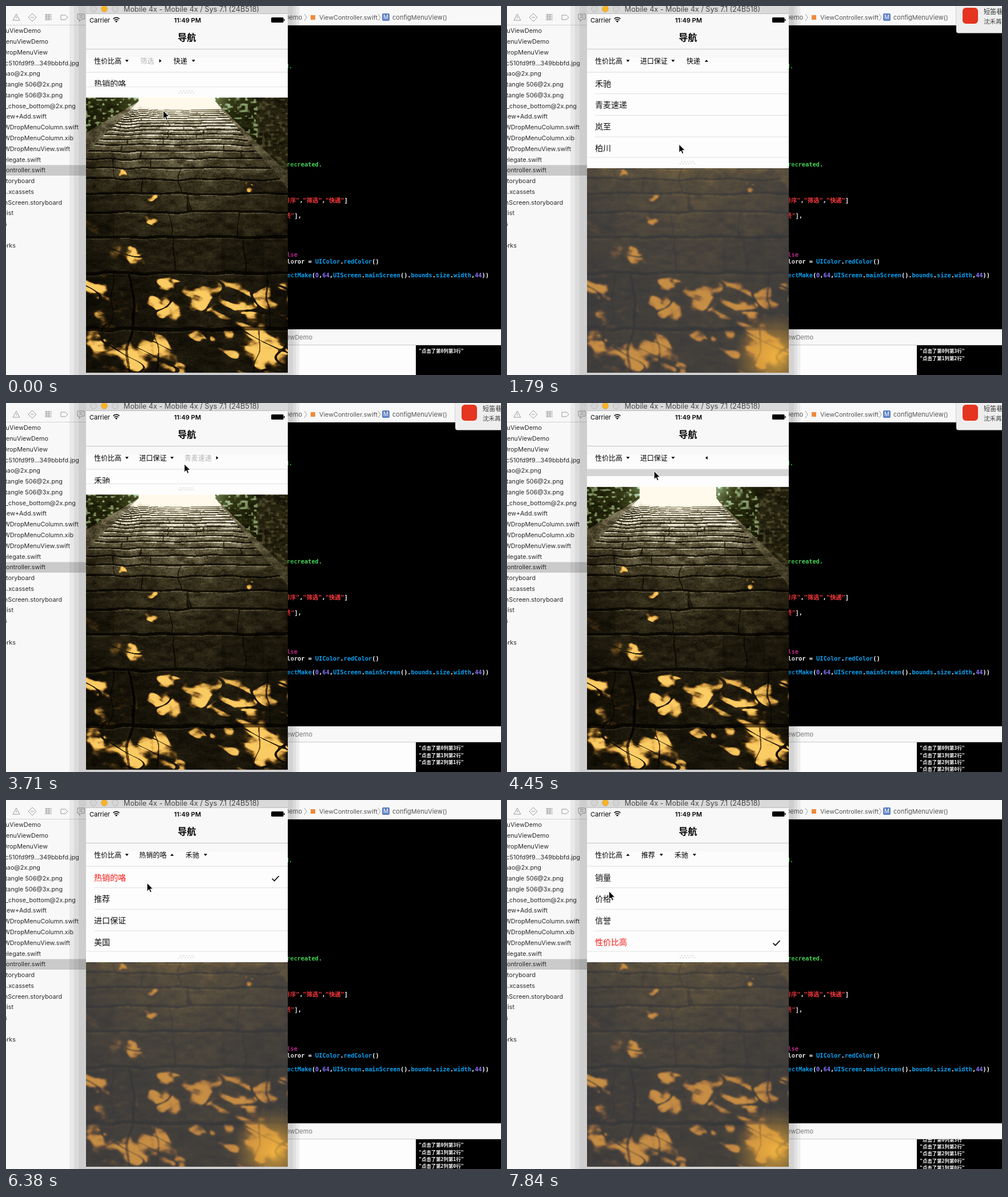
An HTML page with a canvas that plays this animation: 866 by 646 pixels, repeating every 7.99 s.

```html
<!DOCTYPE html>
<html lang="zh">
<head>
<meta charset="utf-8">
<title>Drop menu demo</title>
<style>
html, body { margin: 0; width: 866px; height: 646px; overflow: hidden; background: #f8f8f8; }
svg, canvas { position: absolute; left: 0; top: 0; display: block; }
canvas { left: 140px; top: 114px; }
text { white-space: pre; font-family: Inter, "Noto Sans CJK SC", "Noto Sans CJK", sans-serif; }
.code { font-family: "DejaVu Sans Mono", "Noto Sans CJK SC", "Noto Sans CJK", monospace; font-weight: 700; }
</style>
</head>
<body>
<svg id="back" width="866" height="646" viewBox="0 0 866 646"></svg>
<canvas id="photo" width="353" height="528"></canvas>
<canvas id="dim" width="353" height="528"></canvas>
<svg id="front" width="866" height="646" viewBox="0 0 866 646"><g id="phone"></g><g id="live"></g></svg>
<script>
const $ = id => document.getElementById(id);
const clamp = (v, a = 0, b = 1) => Math.min(b, Math.max(a, v));
const mix = (a, b, u) => a + (b - a) * u;
const smooth = (a, b, v) => { const u = clamp((v - a) / (b - a)); return u * u * (3 - 2 * u); };
const bell = (v, width) => Math.exp(-((v / width) ** 2));
const rect = (x, y, w, h, fill, more = '') =>
  `<rect x="${x}" y="${y}" width="${w}" height="${h}" fill="${fill}" ${more}/>`;
const text = (x, y, size, str, fill = '#000', more = '') =>
  `<text x="${x}" y="${y}" font-size="${size}" fill="${fill}" ${more}>${str}</text>`;
const path = (d, more = '') => `<path d="${d}" ${more}/>`;
const END = 'text-anchor="end"', MID = 'text-anchor="middle"';

// ---- editor window behind the phone ----
// file name and where it ends; the window is cut off on the left
const files = [
  ['nuViewDemo', 61], ['MenuViewDemo', 74], ['DropMenuView', 73], ['4c510fd9f9...349bbbfd.jpg', 128],
  ['zhao@2x.png', 60], ['ctangle 506@2x.png', 99], ['ctangle 506@3x.png', 99],
  ['n_chose_bottom@2x.png', 122], ['View+Add.swift', 71], ['DWDropMenuColumn.swift', 127],
  ['DWDropMenuColumn.xib', 118], ['DWDropMenuView.swift', 112], ['Delegate.swift', 61],
  ['Controller.swift', 69], ['storyboard', 50], ['s.xcassets', 49], ['chScreen.storyboard', 98],
  ['list', 13], ['s', 2], ['', 0], ['works', 17]
];
const span = (fill, str) => `<tspan fill="${fill}">${str}</tspan>`;
const blue = s => span('#08a2f4', s), red = s => span('#ff3b3f', s), violet = s => span('#8577ff', s);
const code = (x, y, spans, more = '') => text(x, y, 10.3, spans, '#fff', `class="code" ${more}`);

function drawEditor() {
  const line = 'fill="none" stroke="#9a9a9a"';
  let s = rect(0, 0, 866, 646, '#f8f8f8') + rect(0, 33, 866, 1, '#d4d4d4');
  s += path('M12 25L18 14L24 25ZM18 18V22M46 13L53 20L46 27L39 20ZM43 20H49M68 15H80M68 18H80M68 21H80M68 24H80' +
    'M71 14V25M75 14V25M96 16H104L108 20L104 24H96ZM125 14H137V23H132L128 27V23H125ZM128 17H134M128 20H134', line);
  s += rect(0, 278.5, 140, 18.5, '#cacaca');
  files.forEach(([name, x], i) => s += text(x, 47.3 + i * 18.77, 10.8, name, '#2b2b2b', END));
  s += rect(493, 34, 373, 532, '#000') + rect(493, 593, 373, 1, '#c9c9c9') +
    rect(493, 594, 224, 52, '#fdfdfd') + rect(717, 594, 149, 52, '#000');
  s += text(518, 24, 11, 'ViewDemo', '#555', END) +
    path('M522 14L526 20L522 26M651 14L655 20L651 26', line) +
    rect(533, 16, 8, 8, '#f08a3c') + text(548, 24, 10.8, 'ViewController.swift', '#555') +
    rect(658, 13, 13, 13, '#5c7fc4', 'rx="2"') + text(664.5, 23.3, 10, 'M', '#fff', MID) +
    text(676, 24, 11, 'configMenuView()', '#555') + text(536, 584, 11, 'ViewDemo', '#777', END);
  s += code(501, 109, span('#45d654', 'd.'), END) + code(553, 281, span('#45d654', 'recreated.'), END);
  s += code(598, 344, ['排序', '筛选', '快递'].map(w => red(`"${w}"`)).join(',') + ']', END);
  s += code(517, 371, red('费"') + '],', END) + code(510, 439, span('#d42b9a', 'else'), END);
  s += code(491.5, 451, `loror = ${blue('UIColor')}.${blue('redColor')}()`);
  s += code(491.5, 475, `${blue('ectMake')}(${violet('0')},${violet('64')},` +
    ['UIScreen', 'mainScreen', 'bounds', 'size', 'width'].map(blue).join('.').replace('mainScreen</tspan>', '$&()') +
    `,${violet('44')}))`);
  for (const g of [29, 21, 13])
    s += rect(140 - g, -g, 353 + g * 1.7, 700, '#000', `opacity=".06" rx="${g}"`);
  $('back').innerHTML = s;
}

// ---- stairway picture, shaded pixel by pixel ----
let seed = 11;
const random = () => (seed = (seed * 16807) % 2147483647) / 2147483647;
const grid = Array.from({ length: 4096 }, random);
const lattice = (x, y) => grid[((y & 63) << 6) | (x & 63)];

function noise(x, y) {
  const ix = Math.floor(x), iy = Math.floor(y), u = smooth(0, 1, x - ix), v = smooth(0, 1, y - iy);
  return mix(mix(lattice(ix, iy), lattice(ix + 1, iy), u), mix(lattice(ix, iy + 1), lattice(ix + 1, iy + 1), u), v);
}
const fbm = (x, y) => noise(x, y) * .5 + noise(x * 2.1, y * 2.1) * .3 + noise(x * 4.3, y * 4.3) * .2;

// main patches of sunlight: x, y, radius
const sun = [
  [155, 496, 17], [288, 528, 20], [284, 486, 13], [345, 519, 16], [425, 532, 20], [224, 614, 24], [272, 602, 19],
  [455, 602, 36], [160, 592, 15], [222, 438, 15], [250, 376, 12], [258, 338, 8], [205, 293, 6], [425, 316, 8]
];

function sunlight(x, y, rough) {
  if (y < 280) return 0;
  const wx = x + (noise(x / 11, y / 11) - .5) * 16, wy = y + (noise(x / 9 + 30, y / 9) - .5) * 13;
  let g = 0;
  for (const [sx, sy, r] of sun) {
    const dx = wx - sx, dy = wy - sy - dx * .3;
    if (Math.abs(dx) < r * 3 && Math.abs(dy) < r * 3) g += 1.15 * bell(dx, r * 1.15) * bell(dy, r * .85);
  }
  const streak = smooth(.45, .85, noise((x + y * .5) / 27, (y - x * .45) / 12));
  const low = smooth(462, 490, y) * (1 - .9 * bell(x - 200, 28));
  g += streak * Math.max(.75 * low, .45 * smooth(300, 180, x) * smooth(360, 380, y));
  const twig = smooth(.06, .015, Math.abs(noise((x + y) / 70, (y - x * .45) / 22) - .5));
  return smooth(.32, 1.05, g * (.6 + .8 * rough) * (1 - .7 * twig));
}

function shade(x, y) {
  const warp = noise(x / 30, y / 30) - .5, rough = fbm(x / 17, y / 8), grain = noise(x / 1.7, y / 1.3);
  const texture = .15 + 1.2 * rough + .5 * grain;
  let light = Math.min(1, .095 + .9 * Math.exp((165 - y) / 70)) * (1 - .35 * ((x - 316) / 176) ** 2);
  light *= mix(1, texture, smooth(150, 215, y));

  // treads in perspective
  let cut = 1;
  const depth = y + 5 * warp - 114, s = 1623 / depth - .6, k = Math.round(s);
  const below = (k - s) * depth * depth / 1623, width = .7 + (y - 150) / 150;
  if (y > 180) {
    if (Math.abs(below) < width) cut = .3;
    else if (below > 0 && below < width + 1.8) light *= 1.6;
    const band = Math.floor(s);
    for (let j = 0; j < 2; j++)
      if (Math.abs(x - 170 - 290 * lattice(band, j) - warp * 14) < 1.1) cut = Math.min(cut, .4);
    light *= .8 + .4 * lattice(band, Math.floor((x + band * 37) / 75));
  }
  if (y > 468 && Math.abs(x - 217 - 7 * Math.sin(y / 26) - warp * 10) < 2.4) cut = .2;

  // walls and bushes at both sides
  const left = x < 300, out = left ? 232 - x : x - 365;
  let leaf = 0;
  if (out > 0 && y < 166 + out * (left ? .6 : 1)) {
    leaf = x < 440 ? 1 : .3;
    cut = 1;
    light = .03 + .12 * rough + .45 * leaf * smooth(.55, .85, noise(x / 5, y / 4)) + .12 * grain * rough;
  } else if (out > 0 && y < 166 + out * (left ? .98 : 1.2)) {
    cut = 1;
    light = .44 * (1 - .5 * out / 128) * texture;
  }
  light = clamp(light * cut + 1.1 * bell(x - 304, 68) * bell(y - 145, 38));

  const gold = sunlight(x, y, rough) * (cut < 1 ? .35 : 1), a = Math.min(1, gold * 1.7);
  return [
    mix(255 * light ** .94 * (1 - .18 * leaf), 150 + 102 * gold, a),
    mix(250 * light, 92 + 112 * gold, a),
    mix(236 * light ** (1.28 + .3 * leaf), 22 + 78 * gold, a)
  ];
}

function drawPhoto() {
  const W = 353, H = 528, clear = new ImageData(W, H), veiled = new ImageData(W, H);
  for (let p = 0; p < W * H; p++) {
    const [r, g, b] = shade(140 + p % W, 114 + Math.floor(p / W));
    clear.data.set([r, g, b, 255], p * 4);
    veiled.data.set([52 + .58 * r, 54 + .43 * g, 58 + .1 * b, 255], p * 4);
  }
  $('photo').getContext('2d').putImageData(clear, 0, 0);
  const c = $('dim').getContext('2d');
  c.putImageData(veiled, 0, 0);
  c.filter = 'blur(1.2px)';
  c.drawImage($('dim'), 0, 0);
  c.filter = 'none';
  const warm = c.createRadialGradient(330, 500, 5, 330, 500, 75);
  warm.addColorStop(0, 'rgba(248,185,62,.75)');
  warm.addColorStop(1, 'rgba(230,160,50,0)');
  c.fillStyle = warm;
  c.fillRect(0, 0, W, H);
}

// ---- fixed parts of the phone ----
function drawPhone() {
  let s = rect(140, 0, 353, 14, '#d9d9d9') + rect(140, 13, 353, 1, '#bdbdbd') + rect(140, 14, 353, 102, '#f8f8f8') +
    rect(140, 75, 353, 1, '#c4c4c4') + rect(140, 90, 353, 26, '#fcfcfc');
  ['#d4d4d4', '#fcb424', '#d4d4d4'].forEach((fill, k) =>
    s += `<circle cx="${153 + k * 19}" cy="5" r="5.5" fill="${fill}" stroke="#000" stroke-opacity=".13"/>`);
  s += text(324.5, 9.5, 12.6, 'Mobile 4x - Mobile 4x / Sys 7.1 (24B518)', '#474747', MID);
  s += text(146, 28.5, 11, 'Carrier') + text(317.5, 28.5, 11, '11:49 PM', '#000', MID + ' font-weight="600"');
  s += path('M187.5 22.5Q193 18 198.5 22.5M189.5 25Q193 22 196.5 25', 'fill="none" stroke="#000" stroke-width="1.6"') +
    path('M191 26.5Q193 25 195 26.5L193 29Z');
  s += rect(464, 20, 21.5, 9, '#000', 'rx="1.5"') + rect(486, 23, 1.5, 3, '#000');
  s += text(316.5, 60.5, 16, '导航', '#000', MID + ' font-weight="700"');
  $('phone').innerHTML = s;
}

// ---- menu behaviour; times are counted in screen refreshes ----
const STEP = 148, LOOP = 7990, FULL = 149, ROW = 37.7, TOP = 116;
const columns = [
  ['销量', '价格', '信誉', '性价比高'],
  ['热销的咯', '推荐', '进口保证', '美国'],
  ['禾驰', '青麦速递', '岚至', '柏川']
];
const unset = ['排序', '筛选', '快递'];
// a column opens, the pointer hovers at x over a row, then picks a row and the column closes
const visits = [
  { open: -.34, col: 1, close: 4.2, row: 2, x: 262 },
  { open: 9.66, col: 2, close: 17.6, row: 1, x: 299, hover: 3.3 },
  { open: 24.66, col: 2, close: 28.16, row: 0, x: 256 },
  { open: 32.66, col: 1, close: 36.34, row: 0, x: 242 },
  { open: 40.66, col: 1, close: 45.5, row: 1, x: 246, hover: .6 },
  { open: 50.66, col: 0, close: 99, row: 1, x: 178 }
];

const rowY = r => TOP + 9 + r * ROW;
const pointer = [[0, 275, 183]];
for (const { open, col, close, row, x, hover = row } of visits) {
  const titleX = 185 + col * 77;
  if (open > 0) pointer.push([open - .8, titleX, 98], [open, titleX, 98]);
  pointer.push([Math.min(open + 3, close), x, rowY(hover)]);
  pointer.push([close - 1.6, x, rowY(hover)], [close, x, rowY(row)], [close + 1.6, x, rowY(row)]);
}
pointer.sort((a, b) => a[0] - b[0]);

function pointerAt(i) {
  const k = pointer.findIndex(p => p[0] > i);
  const [a, ax, ay] = pointer[k - 1], [b, bx, by] = pointer[k], u = 1 - (1 - (i - a) / (b - a)) ** 2;
  return [mix(ax, bx, u), mix(ay, by, u)];
}

function drawTitles(i, chosen, visit, last) {
  let x = 154, s = '';
  columns.forEach((rows, col) => {
    const name = chosen[col] < 0 ? unset[col] : rows[chosen[col]], long = name.length > 2;
    const shown = last && last.col === col ? clamp(i - last.close - 1.9) : 1;
    let fill = '#000', turn = 0;
    if (visit && visit.col === col) {
      const p = (i - visit.open) / 2;
      turn = i >= visit.close ? 90 : p < 1 ? -90 : 180;
      if (p < .5) fill = '#b3b3b3';
    }
    s += text(x + (long ? 0 : 2), 100.5, 12, name, fill, `font-weight="500" opacity="${shown}"`) +
      path('M-3 -1.8H3L0 2Z', `transform="translate(${x + (long ? 57.5 : 37)} 96) rotate(${turn})"`);
    x += long ? 79 : 58;
  });
  return s;
}

function drawPanel(rows, h, picked, closing) {
  const end = TOP + h;
  let s = rect(140, TOP, 353, h + 19, '#fdfdfd');
  s += `<clipPath id="rows"><rect x="140" y="${TOP}" width="353" height="${h}"/></clipPath><g clip-path="url(#rows)">`;
  rows.forEach((name, r) => {
    const y = TOP + r * ROW, on = r === picked;
    if (on && closing) s += rect(140, y, 353, ROW, '#d5d5d5');
    s += text(154, y + 24.6, 14, name, on && !closing ? '#f8150d' : '#111');
    if (on && !closing) s += path(`M465.5 ${y + 21.5}l4 4l8 -8.5`, 'fill="none" stroke="#000" stroke-width="1.6"');
    if (r < 3) s += rect(154, y + 37.2, 339, 1, '#dedede');
  });
  s += '</g>';
  if (!closing) {
    s += rect(140, end - .5, 353, 1, '#e2e2e2');
    for (let k = 0; k < 11; k++) {
      const low = k > 4;
      s += path(`M${low ? 276.5 + k * 5 : 304 + k * 5} ${end + (low ? 11 : 7.5)}l1.5 -1.5l1.5 1.5l-1.5 1.5Z`, 'fill="#dedede"');
    }
  }
  return s;
}

function drawConsole(done) {
  const lines = [{ col: 0, row: 3 }, ...done], up = done.length > 4 ? 9.5 : 0;
  let s = '<clipPath id="log"><rect x="717" y="594" width="149" height="52"/></clipPath><g clip-path="url(#log)">';
  lines.forEach(({ col, row }, k) =>
    s += text(722, 607.3 + k * 12.3 - up, 8.4, `"点击了第${col}列第${row}行"`, '#fff', 'class="code"'));
  return s + '</g>';
}

function drawNotice(i) {
  const off = 80 * (1 - clamp((i - 1) / 4)) ** 2 + 80 * (Math.max(0, i - 36) / 5.65) ** 2;
  if (off >= 80) return '';
  return `<g transform="translate(${off} 0)">` + rect(785, -6, 100, 55, '#000', 'rx="5" opacity=".15"') +
    rect(786, -6, 100, 53.5, '#eeeeee', 'rx="4"') + rect(797, 3, 27, 28, '#e5341f', 'rx="6"') +
    text(834, 14, 11, '短笛巷口', '#333', 'font-weight="500"') + text(834, 30.5, 10.5, '沈禾苒', '#444') + '</g>';
}

function render(i) {
  const done = visits.filter(v => i >= v.close), chosen = [3, -1, -1];
  done.forEach(v => chosen[v.col] = v.row);
  const visit = visits.find(v => i >= v.open && i < v.close + 2);
  let s = drawTitles(i, chosen, visit, done[done.length - 1]), dim = 0;
  if (visit) {
    const { open, col, close } = visit;
    const h = FULL * Math.min(clamp((i - open) / 2), 1 - clamp((i - close) / 2));
    s += drawPanel(columns[col], h, chosen[col], i >= close);
    dim = clamp((h - 25) / (FULL - 25));
  }
  s += rect(140, 115.5, 353, 1, '#dcdcdc') + drawConsole(done) + drawNotice(i);
  s += path('M0 0V14.5L3.4 11.5L5.6 16.6L8 15.5L5.8 10.6H10.4Z',
    `transform="translate(${pointerAt(i)})" fill="#000" stroke="#fff"`);
  $('live').innerHTML = s;
  $('dim').style.opacity = dim;
}

drawEditor();
drawPhoto();
drawPhone();
const start = performance.now();
let last = -1;
function tick() {
  const t = (performance.now() - start) % LOOP;
  const i = Math.min(53, Math.floor((t + 8) / STEP));
  if (i !== last) render(last = i);
  requestAnimationFrame(tick);
}
tick();
</script>
</body>
</html>
```
